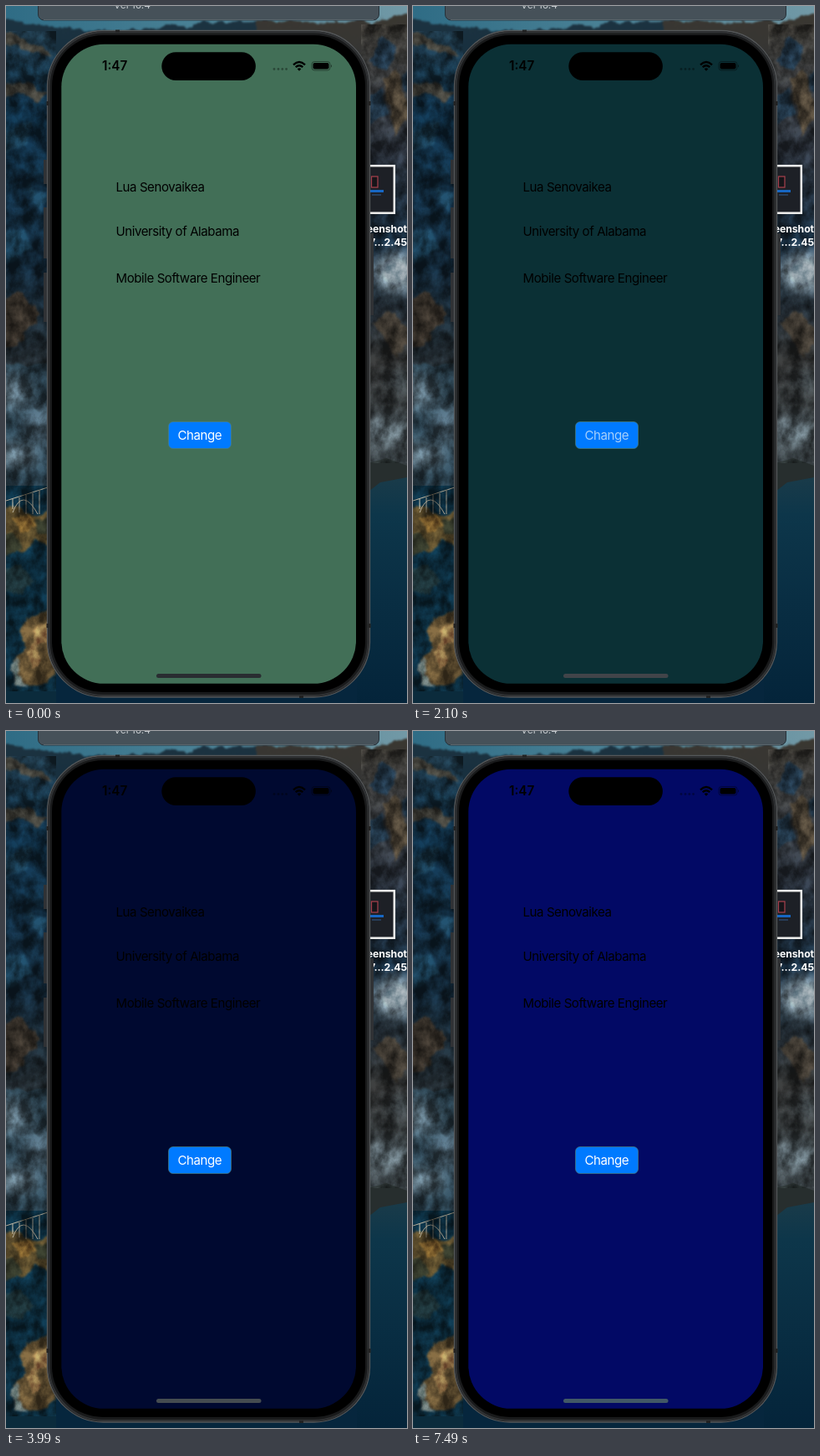
An HTML page for the animation above (8000 ms loop, 480 px wide and 834 px high).

```html
<!DOCTYPE html>
<html lang="en">
<head>
<meta charset="utf-8">
<title>Color change</title>
<style>
  html, body { margin: 0; width: 100%; height: 100%; overflow: hidden; background: #06263d; }
  svg { display: block; width: 480px; height: 834px; }
  text { font-family: Inter, Roboto, sans-serif; }
  filter { color-interpolation-filters: sRGB; }
  .label { font-size: 15.1px; letter-spacing: -.45px; }
  .clock { font-size: 15.3px; font-weight: 600; }
  .file { font-size: 12.3px; font-weight: 700; fill: #fff; text-anchor: end; letter-spacing: -.1px; }
  .grain { mix-blend-mode: overlay; }
</style>
</head>
<body>
<svg viewBox="0 0 480 834">
  <defs>
    <linearGradient id="sky">
      <stop stop-color="#2f6c85"/><stop offset=".5" stop-color="#4b8296"/><stop offset="1" stop-color="#7299a6"/>
    </linearGradient>
    <linearGradient id="sea" x2="0" y2="1">
      <stop stop-color="#1d3c49"/><stop offset=".2" stop-color="#0d364a"/><stop offset="1" stop-color="#04243a"/>
    </linearGradient>
    <linearGradient id="west" x2="0" y2="1">
      <stop stop-color="#1d3340"/><stop offset=".25" stop-color="#0d293d"/>
      <stop offset=".65" stop-color="#112636"/><stop offset="1" stop-color="#252829"/>
    </linearGradient>
    <linearGradient id="east" x2="0" y2="1">
      <stop stop-color="#3a3731"/><stop offset=".3" stop-color="#29303a"/>
      <stop offset=".5" stop-color="#15293a"/><stop offset=".75" stop-color="#2a2b2b"/><stop offset="1" stop-color="#363e42"/>
    </linearGradient>
    <filter id="rough" x="-5%" y="-5%" width="110%" height="110%">
      <feTurbulence type="fractalNoise" baseFrequency=".06" numOctaves="4" seed="4"/>
      <feDisplacementMap in="SourceGraphic" scale="14" xChannelSelector="R" yChannelSelector="G"/>
      <feGaussianBlur stdDeviation=".8"/>
    </filter>
    <filter id="noise" x="0" y="0" width="100%" height="100%">
      <feTurbulence type="fractalNoise" baseFrequency=".06 .05" numOctaves="5" seed="9"/>
      <feColorMatrix values="2 0 0 0 -.52  2 0 0 0 -.52  2 0 0 0 -.52  0 0 0 0 .5"/>
    </filter>
    <filter id="soft" x="-80%" y="-80%" width="260%" height="260%"><feGaussianBlur stdDeviation="9"/></filter>
  </defs>

  <!-- coast -->
  <rect width="480" height="834" fill="#06263d"/>
  <rect width="480" height="60" fill="url(#sky)"/>
  <g filter="url(#rough)">
    <path d="M-20 13 10 17 40 23 80 28 130 30 190 26 230 20 300 18V470H-20Z" fill="url(#west)"/>
    <path d="M300 18 400 19 446 18 464 10 500 16V560H300Z" fill="url(#east)"/>
    <path d="M-10 29 16 36 46 50 54 62 30 56 10 46-10 50Z M-10 96 18 88 50 106 38 116 12 104-10 116Z" fill="#3b3a34"/>
    <path d="M20 66 54 82 44 92 8 78Z M-9 150 28 142 30 162-9 184Z M22 214 50 226 40 250Z M-9 276 24 266 28 290-9 314Z" fill="#17374b"/>
    <path d="M-10 356 14 340 40 368 22 398-10 410Z" fill="#352f28"/>
    <path d="M448 36 468 50 458 76 436 66Z M490 62 472 88 490 118Z M430 106 450 98 456 128 430 144Z" fill="#203445"/>
    <path d="M452 86 468 78 486 130 466 156Z" fill="#4a4134"/>
    <path d="M436 376 466 366 490 400 466 418Z" fill="#39342d"/>
    <path d="M-20 428H70V580H-20Z" fill="#263a46"/>
  </g>
  <rect y="574" width="60" height="260" fill="#0b2b3c"/>
  <rect x="420" y="552" width="60" height="282" fill="url(#sea)"/>
  <path d="M430 548 455 541 480 550V564L448 570 430 584Z" fill="#272e2e"/>
  <g filter="url(#soft)">
    <ellipse cx="4" cy="462" rx="24" ry="20" fill="#566a76"/>
    <ellipse cx="42" cy="500" rx="20" ry="24" fill="#435764"/>
    <ellipse cx="8" cy="538" rx="30" ry="13" fill="#5c6f7a"/>
    <ellipse cx="468" cy="318" rx="27" ry="22" fill="#8b9ca5"/>
    <ellipse cx="474" cy="448" rx="18" ry="10" fill="#4a5459"/>
    <ellipse cx="458" cy="508" rx="30" ry="18" fill="#5d6b72"/>
  </g>
  <g filter="url(#rough)">
    <path d="M-10 602 14 598 36 610 60 602V648L36 640 22 656 4 650-10 660Z" fill="#4f4226"/>
    <path d="M8 610 28 606 36 622 16 628Z" fill="#84642f"/>
    <path d="M-10 630 12 634 22 650-10 664Z M34 614 60 612V632L40 632Z" fill="#2a2e22"/>
    <path d="M-10 674 18 668 34 690 20 704-10 698Z" fill="#1b3035"/>
    <path d="M28 732 60 722V800L44 812 18 808 8 788 24 770 16 748Z" fill="#5b4a2e"/>
    <path d="M36 742 50 738 52 756 38 766 46 782 28 796 24 780Z" fill="#94774a"/>
    <path d="M6 788 16 782 14 800 24 812 8 812Z" fill="#7d8c8a"/>
  </g>
  <path d="M0 592 50 576M8 590V602M16 588V606M24 585V608M32 583V608M40 580V608M8 606Q20 575 38 608" fill="none" stroke="#9a9281" stroke-width="1"/>
  <g class="grain">
    <rect y="30" width="60" height="790" filter="url(#noise)"/>
    <rect x="425" y="22" width="55" height="525" filter="url(#noise)"/>
  </g>

  <!-- desktop items -->
  <rect x="411" y="191.200" width="53.800" height="56.500" fill="#1d2026" stroke="#f1f1ef" stroke-width="2.500"/>
  <rect x="437.500" y="204" width="7.500" height="13" fill="#161519" stroke="#a9414d" stroke-width="1.200"/>
  <path d="M434 221.500H452" stroke="#1767c4" stroke-width="3"/>
  <path d="M438 226H449" stroke="#31598a"/>
  <text class="file" x="480" y="271">Screenshot</text>
  <text class="file" x="480" y="287">7...2.45</text>
  <rect x="38.500" y="-20" width="408" height="37" rx="7" fill="#465159" stroke="#25313a"/>
  <path d="M45 16.500H440" stroke="#69747a" stroke-width=".7"/>
  <text x="129" y="3" font-size="12" fill="#c9ced1">Vel 16.4</text>

  <!-- phone -->
  <path d="M45 184H50V213H45Z M45 241H50V302H45Z M45 319H50V378H45Z M435 272H440V370H435Z" fill="#303235"/>
  <rect x="49.500" y="29.500" width="386" height="797.500" rx="67" fill="#191a1b" stroke="#55585a" stroke-width="1.300"/>
  <rect x="51.500" y="31.500" width="382" height="793.500" rx="65" fill="none" stroke="#303234" stroke-width="2"/>
  <path d="M50 114V119M50 739V744M435 114V119M435 739V744M131 30H136M351 826.500H356" stroke="#222" stroke-width="3"/>
  <rect x="55" y="35" width="375" height="786" rx="61" fill="#000"/>
  <rect id="screen" x="66.300" y="45.800" width="352.700" height="765" rx="51" fill="#426f57"/>
  <rect x="186.300" y="55.200" width="112.600" height="33.800" rx="16.900" fill="#000"/>

  <text class="clock" x="115" y="77">1:47</text>
  <g fill="#000" fill-opacity=".35">
    <circle cx="321" cy="75.500" r="1.400"/><circle cx="326" cy="75.500" r="1.400"/>
    <circle cx="330.800" cy="75.500" r="1.400"/><circle cx="335.600" cy="75.500" r="1.400"/>
  </g>
  <g fill="none" stroke="#000" stroke-width="2.300">
    <path d="M344 70.300Q351 63.700 358 70.300"/>
    <path d="M346.700 73.200Q351 69.200 355.300 73.200"/>
  </g>
  <path d="M348.700 75.200Q351 73.300 353.300 75.200L351 77.700Z"/>
  <rect x="366" y="66.500" width="22" height="10.500" rx="3.300" fill="none" stroke="#000" stroke-opacity=".4"/>
  <rect x="367.500" y="68" width="19" height="7.500" rx="2"/>
  <path d="M389 70Q391 71.800 389 73.600Z" fill-opacity=".5"/>

  <text class="label" x="131.500" y="222">Lua Senovaikea</text>
  <text class="label" x="131.500" y="274.500">University of Alabama</text>
  <text class="label" x="131.500" y="331">Mobile Software Engineer</text>

  <rect x="194.500" y="497.500" width="75" height="32" rx="5.500" fill="#007aff" stroke="#56806f" stroke-opacity=".7" stroke-width=".9"/>
  <text id="caption" class="label" x="205.500" y="518.500" fill="#fff">Change</text>
  <rect id="bar" x="180" y="799" width="125.500" height="5" rx="2.500" fill="#292d31"/>
</svg>
<script>
  const LOOP = 8000;
  const WHITE = '#ffffff', MID = '#d6e9ff', DIM = '#a6cffb';

  // Each row: start in ms, screen colour, home bar colour
  const screens = [
    [0, '#426f57', '#292d31'],
    [700, '#364f43', '#36393d'],
    [1330, '#24483d', '#3b3e43'],
    [1680, '#003b29', '#44424c'],
    [1890, '#0b3035', '#414449'],
    [2520, '#0e2138', '#424850'],
    [3080, '#2a433c', '#3a3e43'],
    [3430, '#476640', '#333333'],
    [3780, '#243839', '#3a4147'],
    [3990, '#000930', '#454c50'],
    [5180, '#020965', '#415866']
  ];
  // Each row: start in ms, button text colour
  const captions = [
    [0, WHITE], [560, DIM], [700, MID], [770, WHITE],
    [1120, DIM], [1330, MID], [1400, WHITE], [1540, DIM], [1680, WHITE],
    [2100, DIM], [2520, MID], [2590, WHITE], [2940, DIM], [3080, WHITE],
    [3220, DIM], [3430, WHITE], [3570, DIM], [3780, MID], [3850, WHITE],
    [5040, DIM], [5180, WHITE]
  ];

  function play(id, rows, column) {
    const frames = rows.map(row => ({
      offset: row[0] / LOOP, fill: row[column], easing: 'steps(1, end)'
    }));
    frames.push({ offset: 1, fill: rows[rows.length - 1][column] });
    const motion = document.getElementById(id).animate(frames, { duration: LOOP, iterations: Infinity });
    motion.startTime = 0;
  }

  play('screen', screens, 1);
  play('bar', screens, 2);
  play('caption', captions, 1);
</script>
</body>
</html>
```
